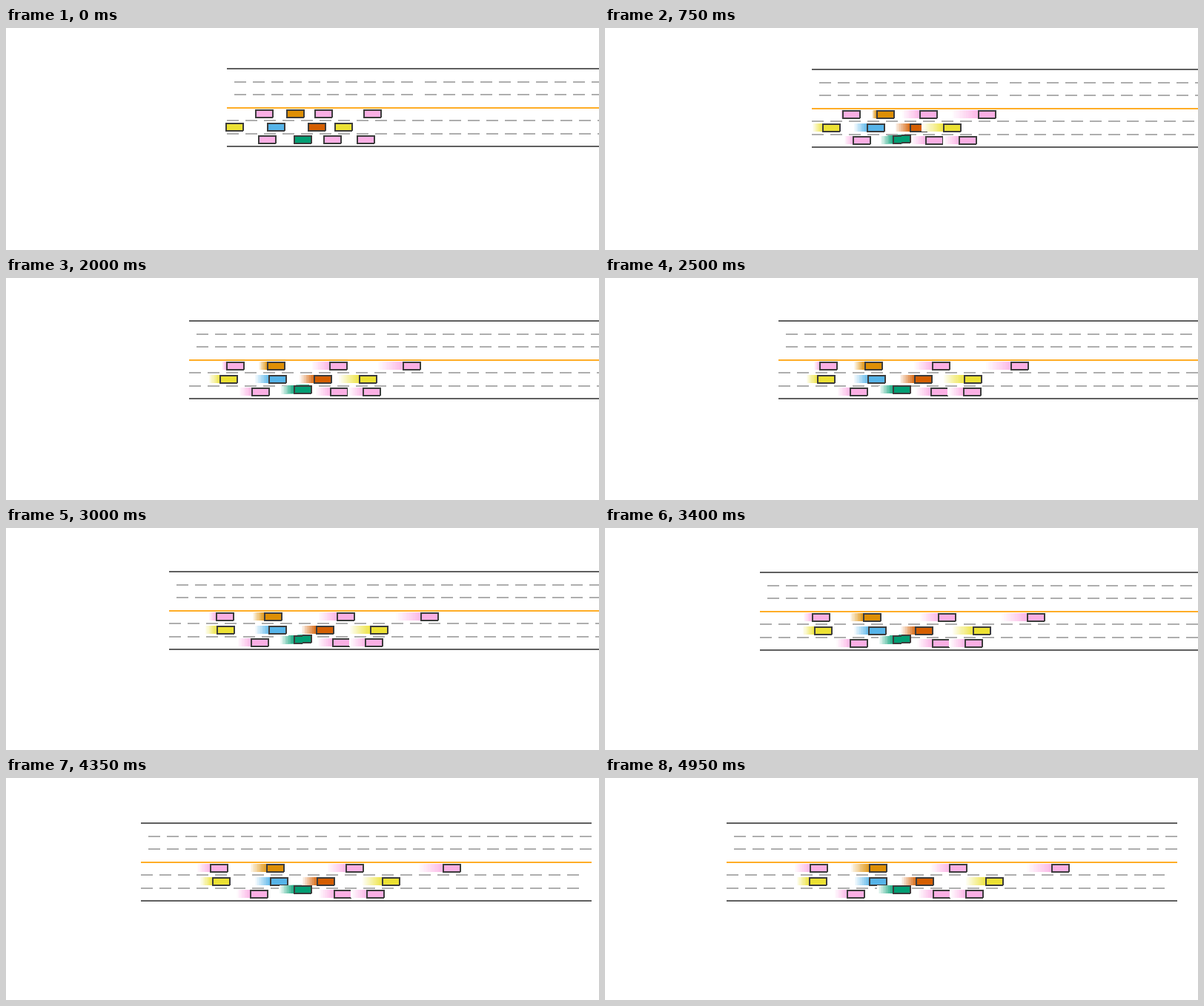
Write a matplotlib script that moves like this. It is 800 px wide and 300 px high and loops after 5 s.

```python
import math

import matplotlib.pyplot as plt
from matplotlib.animation import FuncAnimation
from matplotlib.collections import PolyCollection
from matplotlib.colors import to_rgb

W, H = 800, 300
FRAMES, STEP_MS = 100, 50
STEP = STEP_MS / 1000

ROAD_LENGTH = 608
DASH, PERIOD = 16, 25
LANES = 56, 74, 91
HISTORY = 15

EDGE, STRIPE, CENTER, OUTLINE = "#5f5f5f", "#aeaeae", "#ffad26", "#3c3c3c"
PINK, YELLOW, SKY = "#fbafe4", "#ece133", "#56b4e9"
ORANGE, RUST, GREEN = "#de8f05", "#d55e00", "#029e73"

EGO_X, EGO_Y = 388, 145

# Lane, colour, start, then the speed, t^2 and t^3 terms of the drive in pixels.
CARS = [
    (0, PINK, 336, 2.6, 0.9, 0.32),
    (0, ORANGE, 378, 5.6, 3.42, 0),
    (0, PINK, 416, 34.2, 0.5, 0),
    (0, PINK, 482, 52.2, -0.2, 0),
    (1, YELLOW, 296, 20.6, 0.42, 0),
    (1, SKY, 352, 24.8, 0.62, 0),
    (1, RUST, 407, 29.4, 0, 0),
    (1, YELLOW, 443, 42.6, -0.3, 0),
    (2, PINK, 340, 14.2, 4.0, -0.4),
    (2, PINK, 428, 29.8, 0, 0),
    (2, PINK, 473, 29.5, 0, 0),
]


def travel(t, speed, gain, jerk=0):
    return speed * t + gain * t ** 2 + jerk * t ** 3


def ego_travel(t):
    """Distance driven by the green car, which the camera follows."""
    return travel(t, 24.1, 0.58)


def drift(t):
    """Sideways shift of the green car: a wobbling lane change."""
    return min(0.15 + 1.62 * t + 0.4 * math.sin(2.8 * (t - 1.15)), 6.9)


def lift(t):
    """One pixel of tilt while the green car steers sideways."""
    return int((drift(t + .01) - drift(t - .01)) / .02 > 1)


def rect(x, y, w, h):
    return [(x, y), (x + w, y), (x + w, y + h), (x, y + h)]


def body(x, y, w, h, rise):
    """Box whose front part, beyond the middle of a car, sits higher."""
    if not rise:
        return rect(x, y, w, h)
    m, f = x + w // 2, y - rise
    return [(x, y), (m, y), (m, f), (x + w, f), (x + w, f + h),
            (m, f + h), (m, y + h), (x, y + h)]


class Scene:
    def __init__(self):
        self.shapes, self.colors = [], []

    def add(self, shape, color):
        self.shapes.append(shape)
        self.colors.append(to_rgb(color))

    def dashes(self, x, y, count):
        for i in range(count):
            self.add(rect(x + i * PERIOD, y, DASH, 2), STRIPE)

    def road(self, x, y):
        for dy, color in ((0, EDGE), (53, CENTER), (105, EDGE)):
            self.add(rect(x, y + dy, ROAD_LENGTH, 2), color)
        for dy in (18, 35):
            self.dashes(x + 10, y + dy, 10)
            self.dashes(x + 267, y + dy, 14)
        for dy in (70, 88):
            self.dashes(x, y + dy, 24)

    def car(self, t, place, color):
        """Past poses fading to white, oldest first, then the outlined car.

        place(p) gives x, y and rise at time p as seen by the camera at t.
        """
        count = min(HISTORY, round(t / STEP) + 1)
        for age in range(count - 1, 0, -1):
            x, y, rise = place(t - age * STEP)
            fade = (age + 1) / count
            tint = [c + fade * (1 - c) for c in to_rgb(color)]
            self.add(body(round(x), y, 24, 11, rise), tint)

        x, y, rise = place(t)
        x = round(x)
        # Two overlapping boxes leave the lower right corner open.
        self.add(body(x, y, 24, 12, rise), OUTLINE)
        self.add(rect(x + 23, y - rise, 2, 11), OUTLINE)
        self.add(body(x + 2, y + 2, 21, 8, rise), color)


def build(t):
    scene = Scene()
    top = 54 + int(drift(t))
    camera = ego_travel(t)
    scene.road(int(298.4 - camera), top)

    for lane, color, start, *motion in CARS:
        y = top + LANES[lane]
        scene.car(t, lambda p: (start + travel(p, *motion) - camera, y, 0), color)

    def ego(p):
        return (EGO_X + ego_travel(p) - camera,
                EGO_Y + round(drift(t) - drift(p)), lift(p))

    scene.car(t, ego, GREEN)
    return scene


fig = plt.figure(figsize=(W / 100, H / 100), dpi=100, facecolor="white")
ax = fig.add_axes([0, 0, 1, 1])
ax.set_xlim(0, W)
ax.set_ylim(H, 0)
ax.axis("off")
shapes = PolyCollection([], linewidths=0, edgecolors="none", antialiaseds=False)
ax.add_collection(shapes, autolim=False)


def update(frame):
    scene = build(frame * STEP)
    shapes.set_verts(scene.shapes)
    shapes.set_facecolor(scene.colors)
    return [shapes]


anim = FuncAnimation(fig, update, frames=FRAMES, interval=STEP_MS,
                     repeat=True, repeat_delay=0, blit=False)
plt.show()
```
